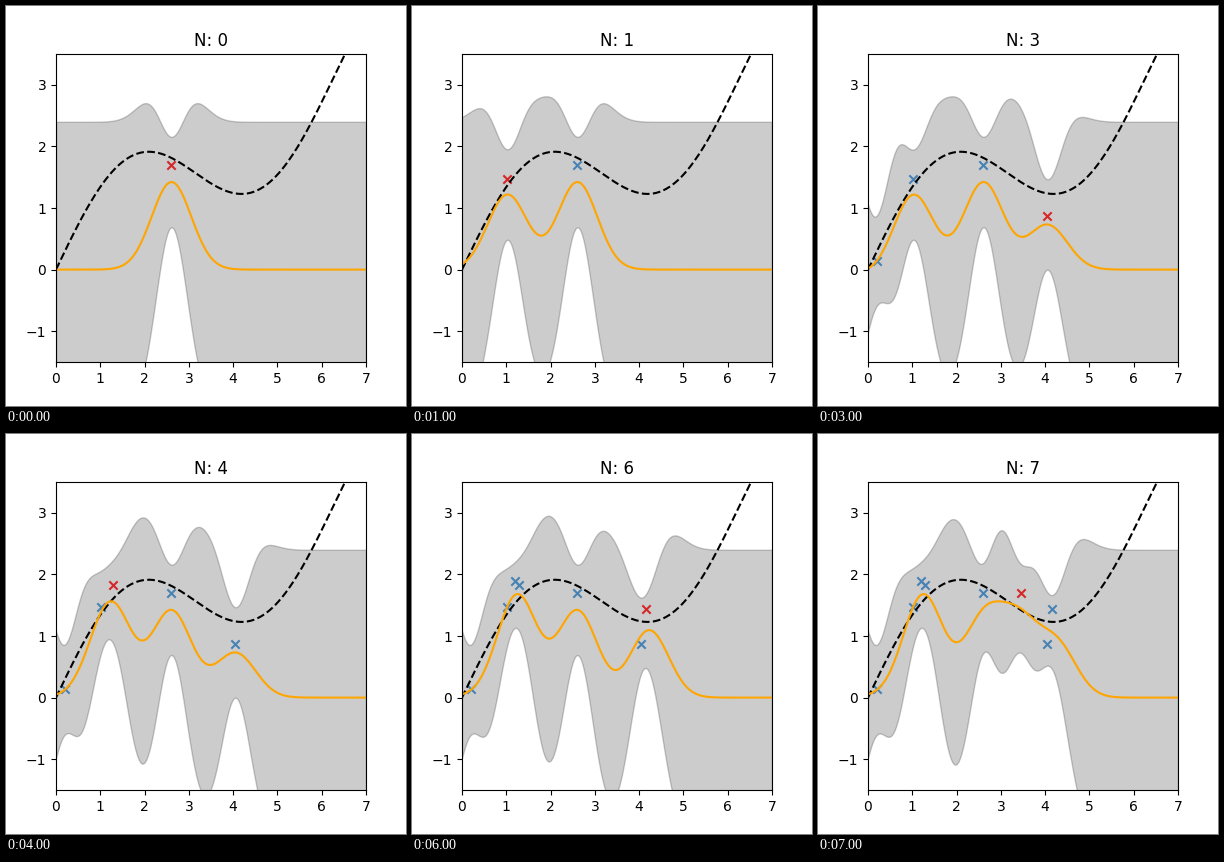
A matplotlib script that plays this animation: 400x400 px, repeating every 8000 ms.

```python
import numpy as np
import matplotlib.pyplot as plt
from matplotlib.animation import FuncAnimation

# Gaussian process regression, gaining one observation per frame
NOISE = 0.2
LENGTH_SQ = 0.2
OBS_X = np.array([2.608, 1.027, 0.203, 4.053, 1.276, 1.208, 4.166, 3.444])
OBS_Y = np.array([1.706, 1.463, 0.133, 0.878, 1.820, 1.885, 1.432, 1.690])
GRID = np.linspace(0, 7, 200)


def kernel(a, b):
    return np.exp(-(a[:, None] - b[None, :]) ** 2 / (2 * LENGTH_SQ))


def predict(x, y):
    """Posterior mean and variance, observation noise included."""
    cov = kernel(x, x) + NOISE * np.eye(len(x))
    cross = kernel(x, GRID)
    weights = np.linalg.solve(cov, cross)
    mean = weights.T @ y
    var = 1 + NOISE - np.sum(cross * weights, axis=0)
    return mean, var


fig, ax = plt.subplots(figsize=(4, 4), dpi=100)


def draw(i):
    ax.clear()
    x, y = OBS_X[:i + 1], OBS_Y[:i + 1]
    mean, var = predict(x, y)
    ax.fill_between(GRID, mean - 2 * var, mean + 2 * var,
                    color="black", alpha=0.2)
    ax.plot(GRID, np.sin(GRID) + GRID / 2, "--", color="black")
    ax.plot(GRID, mean, color="orange")
    ax.scatter(x[:-1], y[:-1], marker="x", color="steelblue")
    ax.scatter(x[-1:], y[-1:], marker="x", color="tab:red")
    ax.set_xlim(0, 7)
    ax.set_ylim(-1.5, 3.5)
    ax.set_xticks(range(8))
    ax.set_title(f"N: {i}")
    return []


anim = FuncAnimation(fig, draw, frames=len(OBS_X), interval=1000,
                     init_func=lambda: [], repeat=True, repeat_delay=0)
plt.show()
```
